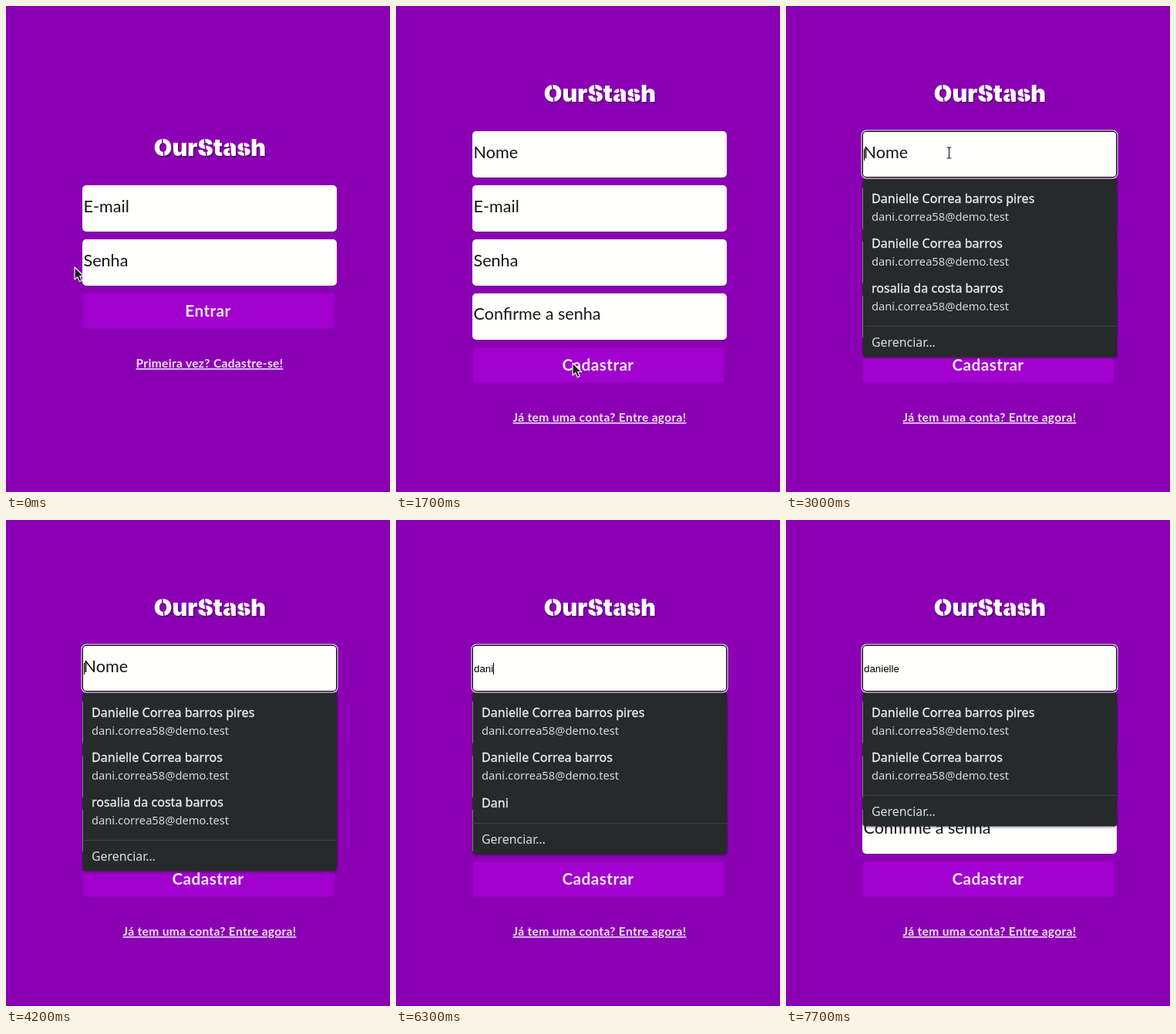
An HTML page for the animation above (8 s loop, 498 by 629 pixels).

```html
<!DOCTYPE html>
<html lang="pt-BR">
<head>
<meta charset="utf-8">
<title>Cadastro</title>
<style>
  html, body { margin: 0; width: 100%; height: 100%; overflow: hidden; background: #8c00b4; }
  svg { display: block; width: 498px; height: 629px; }
  .brand { font: 900 30.5px Inter, sans-serif; fill: #fff; text-anchor: middle; }
  .label { font: 400 21.6px Lato, sans-serif; fill: #151515; }
  .button { font: 700 20.8px Lato, sans-serif; letter-spacing: .4px; fill: #f6e9fa; text-anchor: middle; }
  .link { font: 700 15.6px Lato, sans-serif; letter-spacing: .3px; fill: #f3e4f9; text-anchor: middle; text-decoration: underline; }
  .typed { font: 13.33px "Liberation Sans", Arial, sans-serif; fill: #000; }
  .name { font: 400 16.1px "Noto Sans", sans-serif; fill: #e8eaed; stroke: #e8eaed; stroke-width: .35px; }
  .mail { font: 400 14.7px "Noto Sans", sans-serif; fill: #d6d8db; }
  .manage { font: 400 15.9px "Noto Sans", sans-serif; fill: #dcdee1; }
</style>
</head>
<body>
<svg id="stage" viewBox="0 0 498 629" xmlns="http://www.w3.org/2000/svg">
  <defs>
    <filter id="soft" x="-10%" y="-10%" width="120%" height="125%">
      <feDropShadow dx="0" dy="1.5" stdDeviation="1.5" flood-color="#000" flood-opacity=".35"/>
    </filter>
  </defs>
  <rect width="498" height="629" fill="#8c00b4"/>
</svg>
<script>
const LOOP = 8000, STEP = 100;
const SIGNUP = 1700, FOCUS = 3000;
const stage = document.getElementById('stage');

function add(parent, tag, attrs = {}, text) {
  const el = document.createElementNS('http://www.w3.org/2000/svg', tag);
  for (const key in attrs) el.setAttribute(key, attrs[key]);
  if (text !== undefined) el.textContent = text;
  parent.appendChild(el);
  return el;
}
const group = parent => add(parent, 'g');
const box = (parent, x, y, width, height, rx, fill) =>
  add(parent, 'rect', { x, y, width, height, rx, fill });
const label = (parent, cls, x, y, text) => add(parent, 'text', { class: cls, x, y }, text);
const show = (el, on) => el.setAttribute('display', on ? 'inline' : 'none');

function brand(parent, y) {
  const text = 'OurStash';
  label(parent, 'brand', 266, y + 1.5, text).style.fill = '#5c0078';
  const front = label(parent, 'brand', 264.5, y, text);
  // stencil gaps in the round letters
  for (const i of [0, 3, 5, 6]) {
    const a = front.getStartPositionOfChar(i).x, b = front.getEndPositionOfChar(i).x;
    const mid = (a + b) / 2;
    add(parent, 'path', { d: `M${mid - 1.5} ${y - 24}l3 26`, stroke: '#8c00b4', 'stroke-width': 1.6 });
  }
}

function form(top, fields, action, link) {
  const g = group(stage);
  brand(g, top - 38);
  const labels = fields.map((name, i) => {
    const y = top + i * 70;
    box(g, 98.7, y + .3, 330.6, 60.5, 5, '#60087e');
    box(g, 99, y, 330, 60, 5, '#fffffe');
    return label(g, 'label', 100.5, y + (i === 3 ? 34 : 35), name);
  });
  const end = top + fields.length * 70;
  box(g, 99.5, end, 326, 45.5, 4, '#a100ce');
  label(g, 'button', 262, end + 30, action);
  label(g, 'link', 264, end + 96, link);
  return { g, labels, top, end };
}

const login = form(232, ['E-mail', 'Senha'], 'Entrar', 'Primeira vez? Cadastre-se!');
const signup = form(162, ['Nome', 'E-mail', 'Senha', 'Confirme a senha'],
  'Cadastrar', 'Já tem uma conta? Entre agora!');

// focused field
const focus = group(stage);
box(focus, 97.5, 160.5, 333, 63, 7, '#fff');
box(focus, 98.5, 161.5, 331, 61, 6, '#101010');
box(focus, 100, 163, 328, 58, 4, '#fffffe');
const hint = label(focus, 'label', 100.5, 197, 'Nome');
const typed = label(focus, 'typed', 101, 197, '');
const caret = box(focus, 101, 185, 1, 15, 0, '#000');

// suggestion lists
const MAIL = 'dani.correa58@demo.test';
const PEOPLE = [['Danielle Correa barros pires', MAIL], ['Danielle Correa barros', MAIL]];

function suggestions(people, bottom) {
  const g = group(stage);
  add(g, 'path', {
    d: `M99.5 224H429.5V${bottom - 4.5}q0 4-4 4H103.5q-4 0-4-4z`, fill: '#27292c', filter: 'url(#soft)'
  });
  people.forEach(([name, mail], i) => {
    const y = 255 + i * 58;
    label(g, 'name', 111, mail ? y : y + 1, name);
    if (mail) label(g, 'mail', 111, y + 23, mail);
  });
  box(g, 99.5, bottom - 41, 330, 1, 0, '#3f4246');
  label(g, 'manage', 111, bottom - 14, 'Gerenciar…');
  return { g, bottom };
}

const lists = [
  suggestions([...PEOPLE, ['rosalia da costa barros', MAIL]], 455),
  suggestions([...PEOPLE, ['Dani']], 433),
  suggestions(PEOPLE, 397)
];

// pointer shapes, hot spot at 0,0
const pointer = group(stage);
const shapes = { arrow: group(pointer), hand: group(pointer), beam: group(pointer) };
add(shapes.arrow, 'path', {
  d: 'M0 0v16l3.7-3.4 2.6 6 3-1.3-2.6-5.8h5z',
  fill: '#202020', stroke: '#fff', 'stroke-width': 1.1, 'stroke-linejoin': 'round'
});
add(shapes.hand, 'path', {
  d: 'M-1 .5q1.7-1.6 3.2 0v5.8l6.8 1.4q2 .6 1.9 2.6l-1.1 6.5h-8.6l-5.4-6.3q-.6-2 1.4-2l1.8 1.4z',
  fill: '#fff', stroke: '#222', 'stroke-width': 1, 'stroke-linejoin': 'round'
});
for (const [stroke, width] of [['#fff', 2.6], ['#222', 1.2]])
  add(shapes.beam, 'path', {
    d: 'M-3-7h2l1 1 1-1h2M0-6V6M-3 7h2l1-1 1 1h2', fill: 'none', stroke, 'stroke-width': width
  });

// time, x, y
const PATH = [
  [0, 89, 338], [100, 108, 342], [200, 108, 342], [400, 128, 358], [600, 182, 396],
  [800, 234, 434], [900, 244, 455], [1000, 230, 463], [1700, 229, 462], [1800, 229, 462],
  [1900, 232, 465], [2000, 232, 465], [2200, 226, 420], [2400, 206, 300], [2500, 200, 268],
  [2600, 200, 268], [2700, 211.5, 190], [3200, 211.5, 190], [3500, 236, 226],
  [3700, 318, 254], [4000, 455, 205], [4200, 506, 168]
];

function along(t) {
  const next = PATH.findIndex(p => p[0] > t);
  if (next < 0) return PATH[PATH.length - 1].slice(1);
  const [t0, x0, y0] = PATH[next - 1], [t1, x1, y1] = PATH[next];
  const k = (t - t0) / (t1 - t0);
  return [x0 + (x1 - x0) * k, y0 + (y1 - y0) * k];
}

const inside = (x, y, l, t, r, b) => x >= l && x < r && y >= t && y < b;

function shapeAt(t, x, y) {
  if (t >= SIGNUP && t < 1900) return 'arrow';
  if (t >= FOCUS && inside(x, y, 99, 224, 430, 455)) return 'arrow';
  const { top, end } = t < SIGNUP ? login : signup;
  if (inside(x, y, 99, end, 426, end + 46)) return 'hand';
  if (inside(x, y, 169, end + 80, 359, end + 102)) return 'hand';
  const overField = inside(x, y, 99, top, 429, end - 10) && (y - top) % 70 < 60;
  return overField ? 'beam' : 'arrow';
}

const WORD = 'danielle';
const KEYS = [[5300, 1], [5500, 2], [6300, 4], [6700, 5], [7000, 6], [7100, 8]];

function draw(time) {
  const t = Math.floor((time % LOOP) / STEP) * STEP;
  const focused = t >= FOCUS;
  show(login.g, t < SIGNUP);
  show(signup.g, t >= SIGNUP);
  show(signup.labels[0], !focused);
  show(focus, focused);

  const count = KEYS.reduce((n, [at, size]) => t >= at ? size : n, 0);
  typed.textContent = WORD.slice(0, count);
  show(hint, count === 0);
  const width = count ? typed.getComputedTextLength() : 0;
  caret.setAttribute('x', Math.round(101 + width));
  const blinkOff = (t >= 3700 && t < 4200) || (t >= 4700 && t < 5300) || t >= 7700;
  show(caret, !blinkOff);

  const current = t < 5600 ? 0 : t < 6800 ? 1 : 2;
  lists.forEach((list, i) => show(list.g, focused && i === current));

  const [x, y] = along(t);
  pointer.setAttribute('transform', `translate(${x} ${y})`);
  const kind = shapeAt(t, x, y);
  for (const key in shapes) show(shapes[key], key === kind);
}

const start = performance.now();
function tick() {
  draw(performance.now() - start);
  requestAnimationFrame(tick);
}
tick();
</script>
</body>
</html>
```
